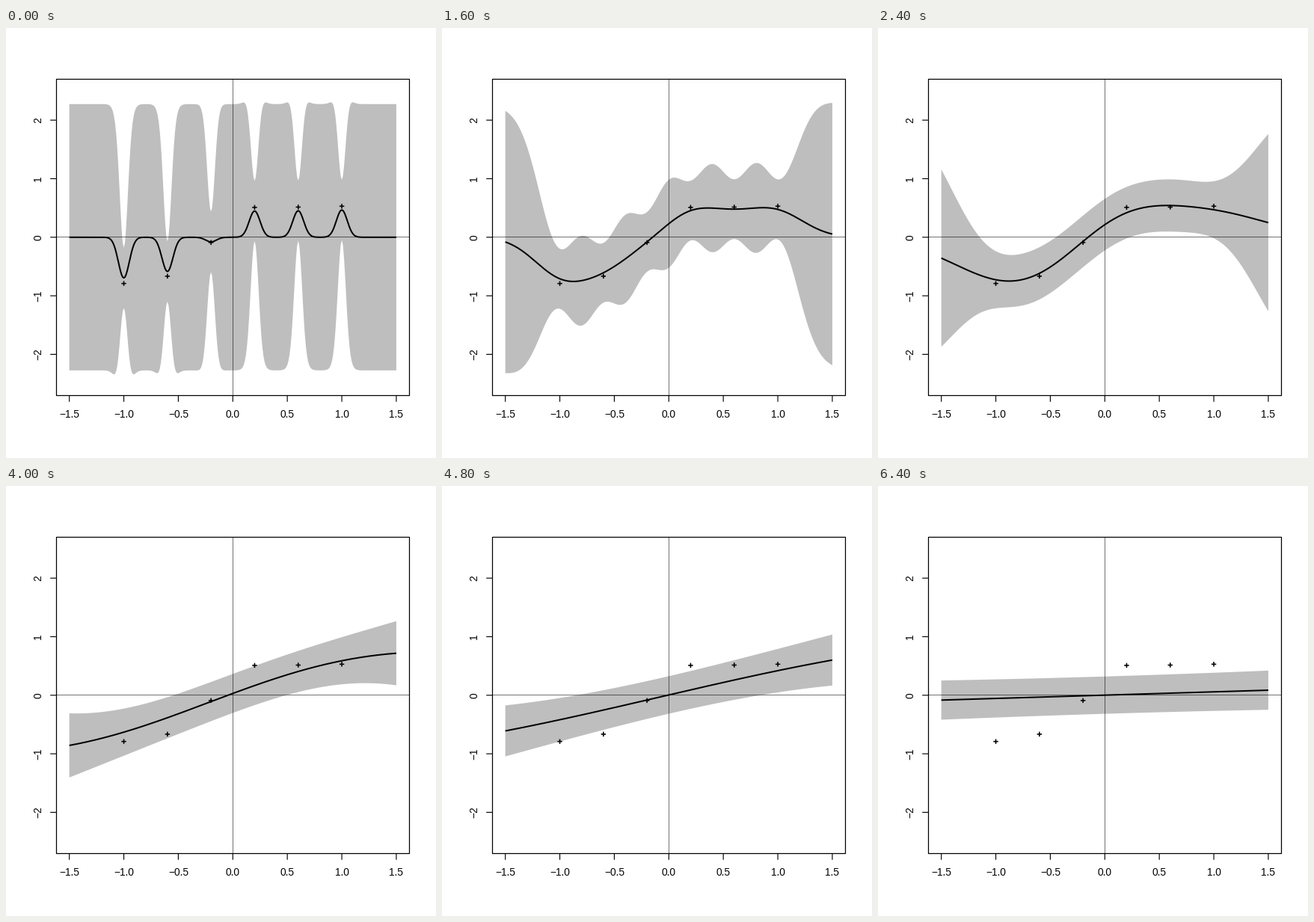
A matplotlib script that plays this animation: 575x575 px, repeating every 7200 ms.

```python
import numpy as np
import matplotlib.pyplot as plt
from matplotlib.animation import FuncAnimation

SIZE, DPI = 575, 100
PT = 72 / DPI                      # points per pixel
LEFT, RIGHT, TOP, BOTTOM = 67.5, 539.5, 68.5, 491.5
NOISE = 0.137                      # noise variance, signal variance is 1
SCALES = [0.05, 0.1, 0.25, 0.5, 1, 2, 4, 8, 16]

xs = np.array([-1, -0.6, -0.2, 0.2, 0.6, 1])
ys = np.array([-0.79, -0.665, -0.09, 0.51, 0.515, 0.53])
grid = np.linspace(-1.5, 1.5, 301)


def px(x):
    return 303.3 + 145.75 * np.asarray(x)


def py(y):
    return 279.8 - 78.3 * np.asarray(y)


def kernel(a, b, scale):
    return np.exp(-0.5 * ((a[:, None] - b[None, :]) / scale) ** 2)


def predict(scale):
    """Mean and predictive variance of the Gaussian process on the grid."""
    cov = kernel(xs, xs, scale) + NOISE * np.eye(len(xs))
    cross = kernel(grid, xs, scale)
    weights = np.linalg.solve(cov, cross.T).T
    return weights @ ys, 1 + NOISE - (weights * cross).sum(axis=1)


fig = plt.figure(figsize=(SIZE / DPI, SIZE / DPI), dpi=DPI, facecolor="white")
ax = fig.add_axes([0, 0, 1, 1])
ax.set_xlim(0, SIZE)
ax.set_ylim(SIZE, 0)
ax.axis("off")


def line(x, y, width, z, **style):
    style = {"color": "black", "solid_capstyle": "butt", "snap": False, **style}
    return ax.plot(x, y, lw=width * PT, zorder=z, **style)[0]


def label(x, y, text, angle=0):
    ax.text(x, y, text.replace("-", "\u2212"), family="Liberation Sans",
            fontsize=13.7 * PT, ha="center", va="baseline",
            rotation=angle, rotation_mode="anchor")


band = ax.fill([0], [0], color="#bebebe", lw=0, zorder=1)[0]
curve = line([], [], 2, 3, solid_joinstyle="round")

line([303.5, 303.5], [TOP, BOTTOM], 1, 2, alpha=0.55)
line([LEFT, RIGHT], [279.5, 279.5], 1, 2, alpha=0.55)
line([LEFT, RIGHT, RIGHT, LEFT, LEFT], [TOP, TOP, BOTTOM, BOTTOM, TOP], 1.25, 5,
     solid_joinstyle="round")

for v in np.arange(-1.5, 1.6, 0.5):
    line([px(v)] * 2, [BOTTOM, BOTTOM + 8.3], 1.15, 5)
    label(px(v), 521.3, f"{v:.1f}")
for v in range(-2, 3):
    line([LEFT - 8.3, LEFT], [py(v)] * 2, 1.15, 5)
    label(47, py(v), str(v), 90)

for x, y in zip(px(xs), py(ys)):
    line([x - 3.2, x + 3.2], [y, y], 1.6, 4)
    line([x, x], [y - 3.2, y + 3.2], 1.6, 4)


def draw(i):
    mean, var = predict(SCALES[i])
    edge = np.concatenate([mean + 2 * var, (mean - 2 * var)[::-1]])
    band.set_xy(np.column_stack([px(np.concatenate([grid, grid[::-1]])), py(edge)]))
    curve.set_data(px(grid), py(mean))
    return band, curve


anim = FuncAnimation(fig, draw, frames=len(SCALES), interval=800,
                     repeat=True, repeat_delay=0)
plt.show()
```
